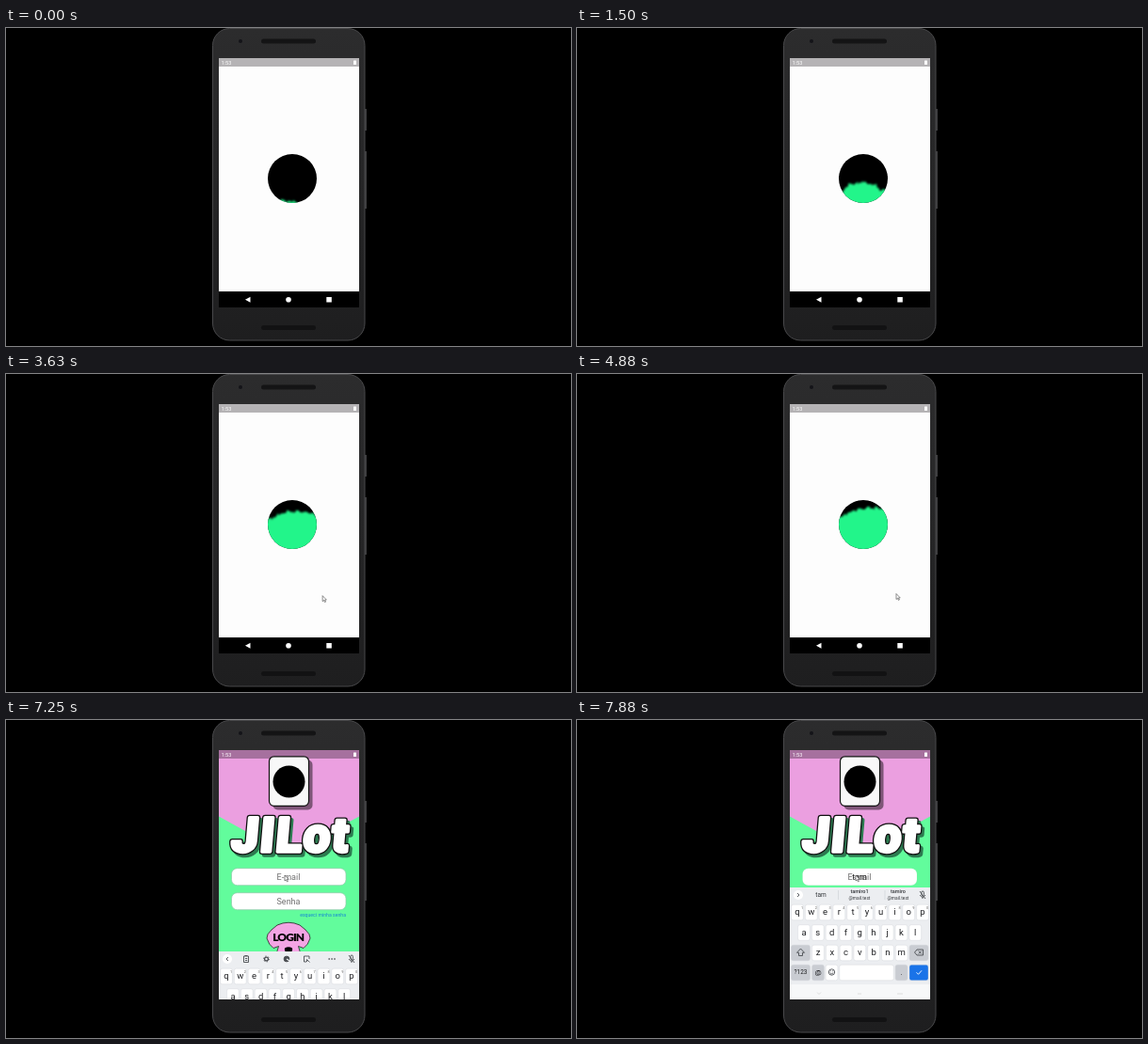
An HTML page that plays this animation: 600x338 px, repeating every 8000 ms.

```html
<!DOCTYPE html>
<html lang="pt">
<head>
<meta charset="utf-8">
<style>
html, body { margin: 0; width: 100%; height: 100%; overflow: hidden; background: #000; }
svg { display: block; width: 600px; height: 338px; }
text { font-family: Roboto, sans-serif; text-anchor: middle; }
.heavy { font-family: Lato, sans-serif; font-weight: 900; }
.icon { fill: none; stroke: #4a4d52; stroke-width: .9; }
</style>
</head>
<body>
<svg viewBox="0 0 600 338">
  <defs>
    <clipPath id="screen"><rect x="226" y="32" width="149" height="265"/></clipPath>
    <clipPath id="disc"><circle cx="304" cy="160" r="26"/></clipPath>
    <filter id="soft" x="-20%" y="-20%" width="140%" height="140%">
      <feTurbulence type="fractalNoise" baseFrequency=".25 .12" numOctaves="2" seed="4"/>
      <feDisplacementMap in="SourceGraphic" scale="7" xChannelSelector="R" yChannelSelector="G"/>
      <feGaussianBlur stdDeviation="1.1"/>
    </filter>
    <linearGradient id="body" x2="0" y2="1">
      <stop stop-color="#2c2c2d"/><stop offset=".5" stop-color="#262627"/><stop offset="1" stop-color="#1e1e1f"/>
    </linearGradient>
  </defs>
  <rect width="600" height="338"/>

  <!-- phone -->
  <path d="M382 86V109M382 131V192" stroke="#3c3c3e" stroke-width="2"/>
  <rect x="219.5" y=".5" width="161.5" height="331.5" rx="18" fill="url(#body)" stroke="#48484a"/>
  <rect x="271" y="11.5" width="58" height="5" rx="2.5" fill="#141415"/>
  <rect x="271" y="316" width="58" height="5" rx="2.5" fill="#121213"/>
  <circle cx="249" cy="14" r="2" fill="#141418"/>

  <g clip-path="url(#screen)">
    <g id="splash">
      <rect x="226" y="32" width="149" height="265" fill="#fdfdfd"/>
      <rect x="226" y="32" width="149" height="9" fill="#b5b3b5"/>
      <circle cx="304" cy="160" r="26"/>
      <g clip-path="url(#disc)"><path id="paint" fill="#20f58a" filter="url(#soft)"/></g>
    </g>

    <g id="login">
      <rect x="226" y="32" width="149" height="265" fill="#62fc9c"/>
      <path d="M226 32H375V102.500L300 143L226 102.500Z" fill="#eb9fe0"/>
      <rect x="226" y="32" width="149" height="9" fill="#a6709e"/>
      <rect x="283.500" y="42.500" width="42" height="53" rx="5" fill="#7d5577"/>
      <rect x="279.500" y="38.800" width="42" height="52.500" rx="5" fill="#f8f8f8" stroke="#111" stroke-width="1.2"/>
      <circle cx="300.500" cy="65.500" r="17"/>
      <g class="heavy" font-size="51" letter-spacing="1.500" stroke-linejoin="round" transform="translate(301 139.500) skewX(-5)">
        <text x="3" y="3" fill="#2c7a50" stroke="#2c7a50" stroke-width="5.500">JILot</text>
        <text stroke="#111" stroke-width="6">JILot</text>
        <text fill="#fff" stroke="#fff" stroke-width="3.400">JILot</text>
      </g>
      <g fill="#fff" stroke="#8fc9a8" stroke-width=".7">
        <rect id="email" x="239.500" y="157.700" width="121.500" height="18" rx="6"/>
        <rect x="239.500" y="183.700" width="121.500" height="18" rx="6"/>
      </g>
      <g font-size="9" fill="#707070">
        <text x="300" y="169.700">E-mail</text>
        <text x="300" y="195.500">Senha</text>
        <text id="typed" x="300" y="169.700" fill="#222">tam</text>
      </g>
      <g font-size="5.2">
        <text x="361" y="209" fill="#1787d4" style="text-anchor:end">esqueci minha senha</text>
        <text x="267" y="265.500" fill="#173523" style="text-anchor:start">Não tem conta? <tspan fill="#1787d4">Cadastre-se!</tspan></text>
      </g>
      <path d="M288 218Q300 212.500 312 218L318 223Q323.500 228 323 232Q321 239 316 242.500L310.500 240.500Q313 246 311.500 250Q309 256.500 300 254Q291 256.500 288.500 250Q287 246 289.500 240.500L284 242.500Q279 239 277 232Q276.500 228 282 223Z" fill="#f3a4e4" stroke="#222" stroke-width=".8"/>
      <path d="M296 242.500Q300 240 304 242.500Q305 246 300 249.500Q295 246 296 242.500Z"/>
      <text class="heavy" x="299.700" y="235.300" font-size="12" letter-spacing="-.9">LOGIN</text>
    </g>

    <g fill="#fff">
      <text x="234" y="38.700" font-size="5.500">1:53</text>
      <rect x="369" y="34.500" width="3" height="4.500" rx=".5"/>
      <rect x="226" y="280" width="149" height="17" fill="#000"/>
      <path d="M254 288.700L259.500 285.700V291.700Z"/>
      <circle cx="300" cy="288.700" r="2.800"/>
      <rect x="340.300" y="286" width="5.500" height="5.500"/>
    </g>

    <g id="board">
      <rect x="226" y="178" width="149" height="119" fill="#eceef1"/>
      <rect x="226" y="281" width="149" height="16" fill="#f7f8f9"/>
      <path d="M255 289.500L257 291.500 259 289.500M298 291H302M340 291H346" stroke="#ddd" fill="none"/>
      <circle cx="235" cy="186" r="5" fill="#fff"/>
      <path id="arrow" class="icon"/>
      <g class="icon">
        <rect x="365.800" y="182" width="2.600" height="5" rx="1.300"/>
        <path d="M364 186Q367 190.500 370 186M367 188V190M364 182L370 190"/>
      </g>
      <g id="tools" class="icon">
        <path d="M252.500 183H257.500V189.500H252.500ZM253.500 182.500H256.500M254 185.500H256.300M254 187.500H256.300"/>
        <circle cx="276.500" cy="186" r="1.900" stroke-width="1.300"/>
        <circle cx="276.500" cy="186" r="3" stroke-dasharray="1.200 1.942"/>
        <circle cx="298" cy="186" r="2.900" fill="#4a4d52"/>
        <path d="M298 186L301 188" stroke="#eceef1" stroke-width="1.300"/>
        <path d="M322 186V183H316.500V189H319M319.500 186.500L322.500 189.500M319.500 186.500V189"/>
        <path d="M342.500 186H350" stroke-width="1.400" stroke-dasharray="1.400 1.500"/>
      </g>
      <g id="hints" fill="#33363a">
        <path d="M277.500 181V191M327 181V191" stroke="#d0d3d7" stroke-width=".7"/>
        <text x="259" y="188" font-size="6.500">tam</text>
        <g font-size="5.500" font-weight="500"><text x="300" y="184">tamiro1</text><text x="341" y="184">tamiro</text></g>
        <g font-size="4.800"><text x="300" y="190.500">@mail.test</text><text x="341" y="190.500">@mail.test</text></g>
      </g>
      <g id="keys"></g>
      <g class="icon">
        <path d="M237.500 243L241.500 247.300H239.500V250.500H235.500V247.300H233.500Z"/>
        <path d="M358.500 247L361 244H367.500V250H361ZM362.800 245.500L365.800 248.500M365.800 245.500L362.800 248.500"/>
        <circle cx="270.500" cy="268" r="3.200"/>
        <path d="M268.800 268.700Q270.500 271 272.200 268.700M269.300 266.300V267.300M271.700 266.300V267.300"/>
        <path d="M360.500 268.300L362.500 270.300 366 266.300" stroke="#fff"/>
      </g>
    </g>
  </g>
  <path id="cursor" d="M0 0V6L1.400 4.800 2.400 6.900 3.400 6.500 2.400 4.400H4.200Z" fill="#fff" stroke="#444" stroke-width=".6"/>
</svg>
<script>
const $ = id => document.getElementById(id);
const show = (id, on) => $(id).style.display = on ? '' : 'none';

// keyboard
let keys = '';
function key(x, y, w, label = '', fill = '#fff', size = 9.5) {
  keys += `<rect x="${x - w / 2}" y="${y - 7.8}" width="${w}" height="16.600" rx="2.200" fill="${fill}" stroke="#cfd2d6" stroke-width=".4"/>` +
    `<text x="${x}" y="${y + size * .34}" font-size="${size}" fill="#202124">${label}</text>`;
}
[['qwertyuiop', 234, 204], ['asdfghjkl', 241, 225.5], ['zxcvbnm', 256, 247]].forEach(([row, x0, y]) =>
  [...row].forEach((c, i) => key(x0 + i * 14.78, y, 12.8, c)));
for (let i = 0; i < 10; i++)
  keys += `<text x="${239 + i * 14.78}" y="200.500" font-size="3.800" fill="#666">${(i + 1) % 10}</text>`;
const gray = '#c9ccd2';
key(237.5, 247, 20, '', gray);
key(363, 247, 20, '', gray);
key(237.5, 268, 20, '?123', gray, 6.5);
key(256, 268, 12.8, '@', gray, 8);
key(270.5, 268, 12.8);
key(307.5, 268, 57.5);
key(344.5, 268, 12.8, '.', gray, 8);
key(363, 268, 20, '', '#1a73e8');
$('keys').innerHTML = keys;

// rows of [step, ...values]
const paintRows = [
  [0, 190, 183, 184, 190, 190], [2, 190, 178, 178, 190, 190], [3, 190, 178, 178, 190, 190],
  [10, 190, 168, 166, 172, 190], [12, 190, 166, 164, 167, 184], [18, 165, 157, 155, 160, 180],
  [21, 160, 155, 153, 157, 172], [23, 160, 153, 151, 154, 166], [24, 160, 153, 151, 154, 166],
  [32, 157, 147, 142, 142, 146]];
const cursorRows = [[1, 232, 261], [13, 229, 321], [18, 329, 241], [24, 329, 241],
  [31, 339, 233.5], [49, 339, 233.5], [53, 296, 165]];
const boardRows = [[57, 119], [58, 68], [59, 20], [60, 4], [61, 0]];

function at(rows, k) {
  const i = rows.findIndex(r => r[0] >= k);
  if (i < 0) return rows[rows.length - 1].slice(1);
  if (i == 0) return rows[0].slice(1);
  const a = rows[i - 1], b = rows[i], p = (k - a[0]) / (b[0] - a[0]);
  return a.slice(1).map((v, j) => v + (b[j + 1] - v) * p);
}

function draw(now) {
  const k = Math.floor((now % 8000 + 5) / 125) % 64; // eight steps per second
  const typed = k >= 63;
  show('splash', k < 48);
  show('login', k >= 48);
  const [l, a, m, b, r] = at(paintRows, k);
  $('paint').setAttribute('d', `M266 ${l}L290 ${a}L304 ${m}L318 ${b}L342 ${r}V205H266Z`);

  show('cursor', k == 1 || k > 12);
  $('cursor').setAttribute('transform', `translate(${at(cursorRows, k)})`);

  show('board', k > 57);
  $('board').setAttribute('transform', `translate(0 ${at(boardRows, k)})`);
  show('typed', typed);
  show('hints', typed);
  show('tools', !typed);
  $('email').setAttribute('stroke-opacity', typed ? .2 : 1);
  $('arrow').setAttribute('d', typed ? 'M234 184L236 186 234 188' : 'M236 184L234 186 236 188');
  requestAnimationFrame(draw);
}
draw(0);
</script>
</body>
</html>
```
